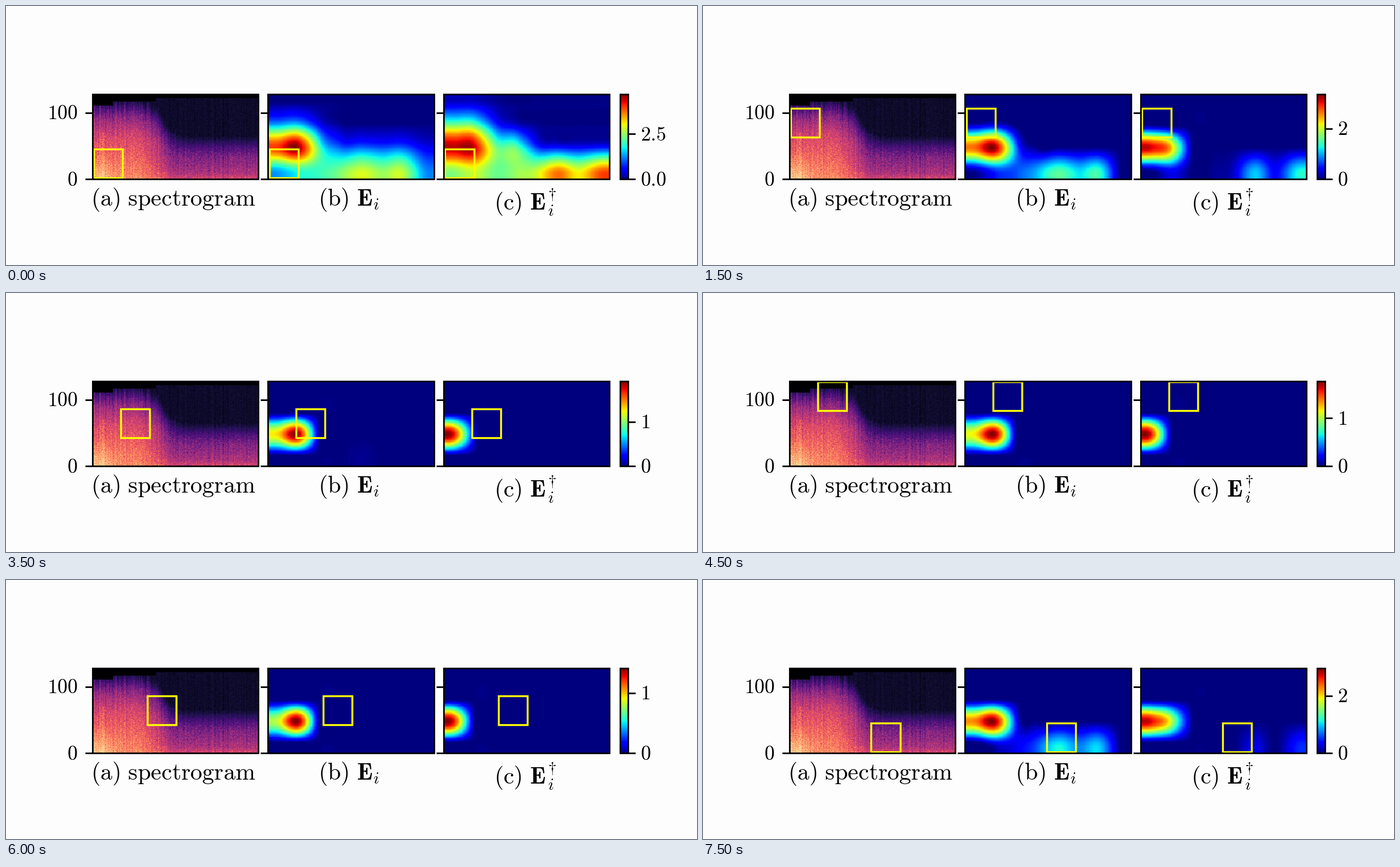
A matplotlib script for the animation above (8 s loop, 1222 by 458 pixels).

```python
import numpy as np
import matplotlib.pyplot as plt
from matplotlib.animation import FuncAnimation
from matplotlib.patches import Rectangle

W, H, DPI = 1222, 458, 64
TOP, BOTTOM, WIDTH = 156, 306, 293.3
LEFTS = [152.8 + 310.6 * k for k in range(3)]
BINS, STEPS = 128, 250
FRAMES, ROWS = 16, 5  # ROWS patch positions per column
FULL = 4.45  # node level of the strongest map

plt.rcParams["mathtext.fontset"] = "cm"


def px(n):
    return n * 72 / DPI


def peak_at(i):
    """Colour scale maximum while patch i is marked."""
    keys = {0: 4.69, 1: 3.9, 3: 3.37, 4: 2.055, 5: 2.255, 7: 1.92,
            11: 1.63, 13: 1.2, 14: 0.1027, 15: 2.97}
    return np.interp(i, list(keys), list(keys.values()))


# Energy nodes on a coarse grid, bottom row first
ROW, COL = np.mgrid[0:4, 0:8]


def bump(r, c, height, wr, wc, power=2):
    return height * np.exp(-((ROW - r) / wr)**2 - abs((COL - c) / wc)**power)


NODES_B = (bump(1, 0.58, 4.8, 1.02, 1.3) + bump(0, 4.4, 2.2, 1.02, 2.9, 4)
           + bump(0, 4, 0.45, 1, 0.7) + bump(0, 6, 0.5, 1, 0.7))
NODES_C = (bump(1, 0.2, 4.33, 1.3, 1.7, 4) + bump(0, 6, 2.5, 0.77, 4.5, 4)
           + bump(1, 2.8, 1.8, 0.8, 0.9)
           + bump(0, 5, 0.85, 0.7, 0.7) + bump(0, 7, 1.0, 0.7, 0.7))
RATE_C = 1.9 - bump(1, 0, 0.9, 0.6, 1)


def cubic(x, a=-0.75):
    near = (a + 2) * x**3 - (a + 3) * x**2 + 1
    far = a * (x**3 - 5 * x**2 + 8 * x - 4)
    return np.where(x <= 1, near, np.where(x < 2, far, 0))


def weights(n_in, n_out):
    out = np.arange(n_out)
    pos = (out + 0.5) * n_in / n_out - 0.5
    base = np.floor(pos).astype(int)
    w = np.zeros((n_out, n_in))
    for k in range(-1, 3):
        node = base + k
        np.add.at(w, (out, np.clip(node, 0, n_in - 1)), cubic(abs(pos - node)))
    return w


UP_Y, UP_X = weights(4, BINS), weights(8, STEPS)


def energy_maps(peak):
    drop = FULL - peak / 1.05
    maps = [UP_Y @ np.clip(nodes - rate * drop, 0, None) @ UP_X.T
            for nodes, rate in ((NODES_B, 1), (NODES_C, RATE_C))]
    scale = peak / max(m.max() for m in maps)
    return [m * scale for m in maps]


def spectrogram():
    rng = np.random.default_rng(4)
    t = np.arange(STEPS)[None, :]
    f = np.arange(BINS)[:, None]
    reach = 57 + 56 / (1 + np.exp((t - 104) / 8))
    reach = reach + rng.normal(0, 4, (1, STEPS)) * np.where(t < 125, 1, 0.3)
    q = f / reach
    loud = np.interp(q, [0, 0.55, 0.8, 1.06], [0.76, 0.59, 0.42, 0.09])
    quiet = np.interp(q, [0, 0.15, 0.6, 1.12], [0.58, 0.47, 0.35, 0.08])
    mix = np.clip((t - 72) / 50, 0, 1)
    s = loud * (1 - mix) + quiet * mix
    s = s + 0.12 * np.exp(-(t / 30)**2 - (f / 32)**2)
    s = s + 0.1 * np.exp(-((t - 15.5) / 1.2)**2) * (f < 70)
    active = np.clip((s - 0.06) / 0.25, 0.3, 1)
    s = s + active * (rng.normal(0, 0.05, (BINS, STEPS))
                      + rng.normal(0, 0.025, (1, STEPS)))
    ceiling = np.where(t < 31, 111, np.where(t < 95, 117, 122))
    return np.where(f >= ceiling, 0.0, np.clip(s, 0.03, 1))


fig = plt.figure(figsize=(W / DPI, H / DPI), dpi=DPI, facecolor="#fdfdfd")
ax = fig.add_axes([0, 0, 1, 1])
ax.axis("off")


def image(data, left, right, cmap):
    return ax.imshow(data, cmap=cmap, vmin=0, vmax=1, origin="lower",
                     aspect="auto", interpolation="nearest",
                     extent=(left, right, BOTTOM, TOP))


def outline(x, y, w, h, color, lw, z):
    return ax.add_patch(Rectangle((x, y), w, h, fill=False, ec=color,
                                  lw=px(lw), joinstyle="miter", zorder=z))


def frame(left, right):
    outline(left, TOP, right - left, BOTTOM - TOP, "black", 2.8, 4)


def tick(x, y):
    return ax.plot([x, x + 12], [y, y], color="black", lw=px(2.8),
                   solid_capstyle="butt", zorder=4)[0]


def label(x, y, text, size=35.5, ha="left"):
    return ax.text(x, y, f"${text}$", fontsize=px(size), ha=ha, va="baseline")


blank = np.zeros((BINS, STEPS))
panels = [image(data, x, x + WIDTH, cmap) for data, x, cmap in
          zip((spectrogram(), blank, blank), LEFTS, ("magma", "jet", "jet"))]
image(np.linspace(0, 1, 256)[:, None], 1086, 1100, "jet")
frame(1086, 1100)

boxes = []
for x in LEFTS:
    frame(x, x + WIDTH)
    for y in (188.5, BOTTOM):
        tick(x - 13, y)
    boxes.append(outline(x, TOP, 51.2, 51, "#ffff00", 3.4, 3))

label(126.5, 200, "100", ha="right")
label(126.5, 317.5, "0", ha="right")
label(150, 353, r"\mathrm{(a)\ spectrogram}", 42)
label(552, 353, r"\mathrm{(b)}\ \mathbf{E}_i", 42)
label(863, 360, r"\mathrm{(c)}\ \mathbf{E}", 42)
label(957.5, 371, "i", 29.4)
label(965.5, 341, r"\dagger", 29.4, "center")

tick(1101, BOTTOM)
bar_tick = tick(1101, TOP)
bar_zero = label(1122, 317.5, "0")
bar_label = label(1122, TOP, "2")

ax.set_xlim(0, W)
ax.set_ylim(H, 0)


def bar_step(peak):
    """Round tick step that fits the colour bar."""
    if peak < 1:
        return 0.1
    return 2.5 if peak > 4 else 2 if peak > 2 else 1


def update(i):
    peak = peak_at(i)
    col, row = divmod(i, ROWS)
    for x, box in zip(LEFTS, boxes):
        box.set_xy((x + 2.4 + 47.4 * col, 252.5 - 23.9 * row))
    for panel, data in zip(panels[1:], energy_maps(peak)):
        panel.set_data(data)
        panel.set_clim(0, peak)

    step = bar_step(peak)
    digits = 0 if step in (1, 2) else 1
    y = BOTTOM - (BOTTOM - TOP) * step / peak
    bar_tick.set_ydata([y, y])
    bar_label.set_y(y + 11.5)
    bar_label.set_text(f"${step:.{digits}f}$")
    bar_zero.set_text(f"${0:.{digits}f}$")
    return [*panels, *boxes, bar_tick, bar_label, bar_zero]


anim = FuncAnimation(fig, update, frames=FRAMES, interval=500,
                     repeat=True, repeat_delay=0, blit=False)
plt.show()
```
